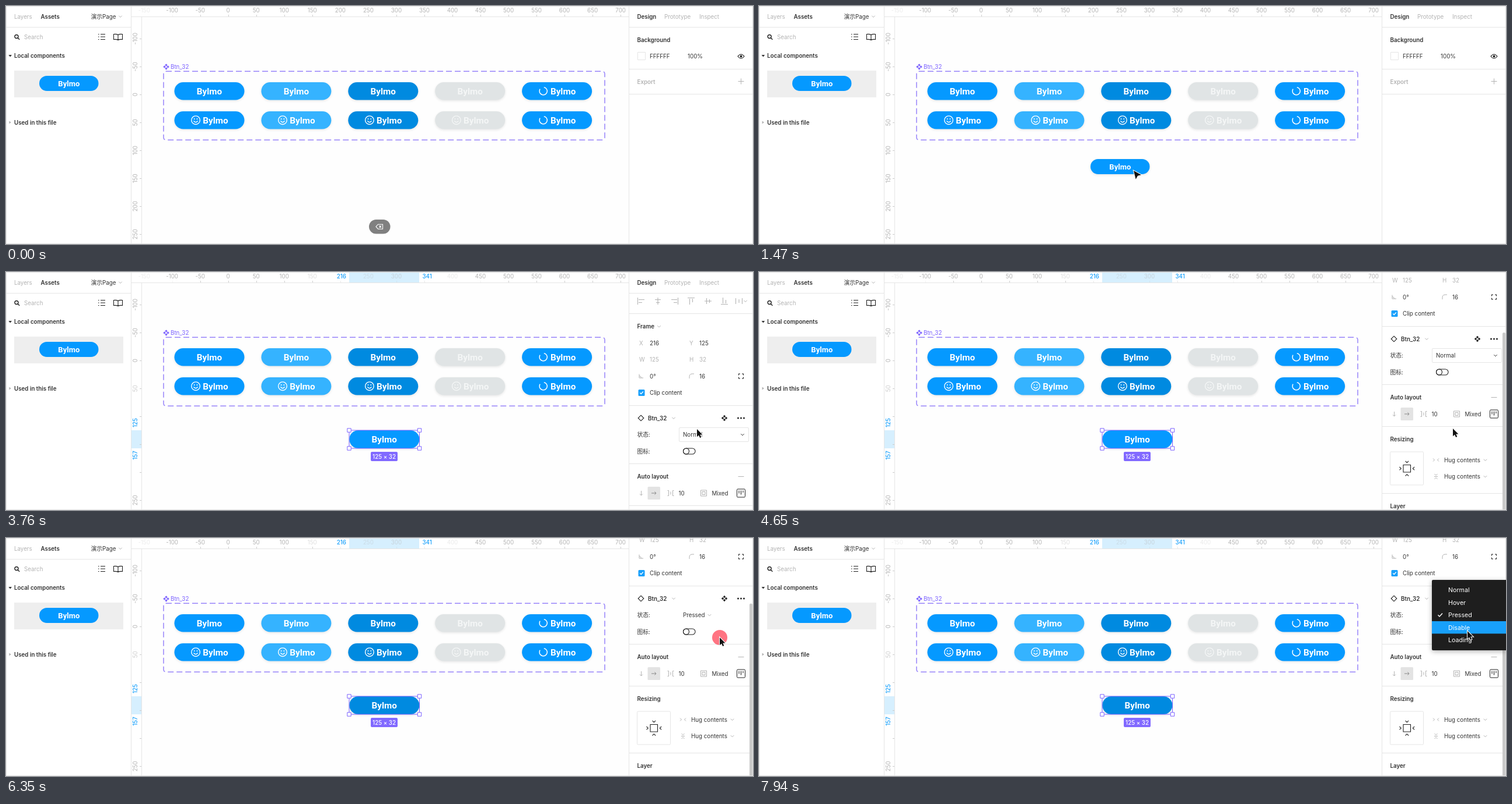
These frames come from a looping animation (1280 px wide and 409 px high, 8 s). An HTML page with a canvas:

```html
<!DOCTYPE html>
<html lang="en">
<head>
<meta charset="utf-8">
<title>Button component demo</title>
<style>
html, body { margin: 0; width: 100%; height: 100%; overflow: hidden; background: #fff; }
canvas { display: block; width: 1280px; height: 409px; }
</style>
</head>
<body>
<canvas id="stage"></canvas>
<script>
const W = 1280, H = 409, LOOP = 8000;
const canvas = document.getElementById('stage');
const c = canvas.getContext('2d');
const dpr = window.devicePixelRatio || 1;
canvas.width = W * dpr;
canvas.height = H * dpr;

const INK = '#333', MUTED = '#b3b3b3', LINE = '#e5e5e5', PURPLE = '#7b61ff', ACCENT = '#18a0fb';
const BLUE = '#0599ff', DARK = '#008ae0';
const FILLS = [BLUE, '#35b3ff', DARK, '#e0e4e5', BLUE];
const BRAND = 'Bylmo';
const STATES = ['Normal', 'Hover', 'Pressed', 'Disable', 'Loading'];

const DROP = 2710, OPEN_1 = 5350, PICK = 6200, CLOSE_1 = 6240, OPEN_2 = 7090;
const CLICKS = [930, OPEN_1, PICK, OPEN_2];

// time, x, y of the pointer tip
const PATH = [
  [60, 377, 355], [650, 60, 128], [880, 60, 128], [1000, 78, 124], [1470, 642, 283],
  [1650, 653, 285], [1710, 655, 285], [1880, 676, 286], [2120, 676, 286], [2240, 670, 285],
  [2690, 670, 285], [2710, 660, 284], [3120, 845, 270], [3290, 845, 270], [3470, 1167, 271],
  [3650, 1167, 271], [3760, 1184, 270], [4180, 1184, 270], [4410, 1188, 269], [4650, 1189, 269],
  [4800, 1189, 269], [5300, 1233, 131], [5470, 1233, 131], [6000, 1223, 171], [6350, 1223, 171],
  [6880, 1216, 137], [7130, 1216, 137], [7550, 1216, 183], [7760, 1216, 169], [7880, 1216, 169],
  [7940, 1214, 160]
];
const SCROLL = [[4180, 0], [4410, 133], [4600, 133], [4650, 136], [4780, 147]];

const clamp = v => Math.max(0, Math.min(1, v));
const ease = p => (1 - Math.cos(Math.PI * clamp(p))) / 2;

function track(keys, t) {
  let i = 0;
  while (i < keys.length - 2 && t >= keys[i + 1][0]) i++;
  const a = keys[i], b = keys[i + 1], p = ease((t - a[0]) / (b[0] - a[0]));
  return a.slice(1).map((v, k) => v + (b[k + 1] - v) * p);
}

// ---- drawing helpers ----
function text(s, x, y, color = INK, weight = 400, align = 'left', size = 9.77, family = 'Inter') {
  c.font = `${weight} ${size}px ${family}, "Noto Sans CJK SC", "Noto Sans CJK", sans-serif`;
  c.textAlign = align;
  c.fillStyle = color;
  c.fillText(s, x, y + size * 0.363);
}
const bold = (s, x, y, color) => text(s, x, y, color, 600);

function rect(x, y, w, h, color) {
  c.fillStyle = color;
  c.fillRect(x, y, w, h);
}
const hline = (x, y, w) => rect(x, y, w, 1, LINE);

function box(x, y, w, h, r, fill, stroke, lw = 1) {
  c.beginPath();
  c.roundRect(x, y, w, h, r);
  if (fill) { c.fillStyle = fill; c.fill(); }
  if (stroke) { c.strokeStyle = stroke; c.lineWidth = lw; c.stroke(); }
}

function icon(d, x, y, color = INK, lw = 1, fill) {
  c.save();
  c.translate(x, y);
  const p = new Path2D(d);
  if (fill) { c.fillStyle = fill; c.fill(p); }
  if (lw) { c.strokeStyle = color; c.lineWidth = lw; c.stroke(p); }
  c.restore();
}
const chevron = (x, y, color = MUTED) => icon('M-2.7-1.3L0 1.4L2.7-1.3', x, y, color);

function diamonds(x, y, color) {
  const d = [[0, -3], [3, 0], [0, 3], [-3, 0]]
    .map(([a, b]) => `M${a} ${b - 2.2}l2.2 2.2l-2.2 2.2l-2.2-2.2z`).join('');
  icon(d, x, y, color, 0, color);
}

function pill(x, y, w, h, color) {
  c.save();
  c.shadowColor = 'rgba(0,0,0,.1)';
  c.shadowBlur = 4 * dpr;
  c.shadowOffsetY = 1.5 * dpr;
  box(x, y, w, h, h / 2, color);
  c.restore();
}
const brand = (x, y, size = 15.3, color = '#fff') => text(BRAND, x, y, color, 700, 'center', size, 'Roboto');

function smallPill(x, y, shadow) {
  if (shadow) pill(x, y, 101.5, 26, BLUE);
  else box(x, y, 101.5, 26, 13, BLUE);
  brand(x + 50.8, y + 12.8, 13);
}

// ---- canvas area ----
function components() {
  diamonds(274.5, 104.5, PURPLE);
  text('Btn_32', 282, 104.5, PURPLE);
  c.setLineDash([10, 5]);
  box(270, 112.3, 756, 118, 4, null, '#9783fa', 1.5);
  c.setLineDash([]);
  FILLS.forEach((fill, k) => {
    for (let row = 0; row < 2; row++) {
      const x = 288.5 + k * 148.9, y = 131 + row * 50, mid = y + 15.2;
      const ink = k === 3 ? '#f4f6f6' : '#fff';
      pill(x, y, 120, 30.5, fill);
      if (k === 4) {
        c.beginPath();
        c.arc(x + 36.6, mid, 6.6, -1.4, 3.7);
        c.strokeStyle = ink;
        c.lineWidth = 1.5;
        c.stroke();
      } else if (row) {
        icon('M7.3 0A7.3 7.3 0 1 1-7.3 0A7.3 7.3 0 1 1 7.3 0M-3.6 1.2Q0 6 3.6 1.2', x + 36.6, mid, ink, 1.4);
        icon('M-3.3-2.9h1.8v1.8h-1.8zM1.5-2.9h1.8v1.8h-1.8z', x + 36.6, mid, ink, 0, ink);
      }
      brand(x + (row || k === 4 ? 70.5 : 60), mid, 15.3, ink);
    }
  });
}

function instance(color) {
  pill(588.3, 272, 120, 31, color);
  brand(648.3, 287.3);
  box(588, 272, 120.5, 31, 0, null, PURPLE);
  for (const x of [588, 708.5]) for (const y of [272, 303]) box(x - 3.2, y - 3.2, 6.4, 6.4, 0, '#fff', PURPLE);
  box(625, 309, 46, 16, 2, '#8169ff');
  text('125 × 32', 648, 317, '#fff', 500, 'center');
}

function rulers(selected) {
  rect(214, 0, 853, 18, '#fff');
  rect(214, 0, 18, H, '#fff');
  if (selected) {
    rect(588, 1, 120, 17, '#d6effe');
    rect(215, 272, 17, 31, '#d6effe');
  }
  hline(214, 18, 853);
  rect(232, 18, 1, H, LINE);
  const strength = (p, marks) => Math.min(1, ...marks.map(m => clamp((Math.abs(p - m) - 32) / 42)));
  for (let u = -150; u <= 700; u += 50) {
    const x = 380.7 + u * 0.9606;
    if (x > 240) rect(Math.round(x), 15, 1, 3, '#ccc');
    c.globalAlpha = u === -150 ? 0.25 : selected ? strength(x, [575, 721]) : 1;
    text(u, x, 7, MUTED, 400, 'center');
  }
  for (let u = -100; u <= 250; u += 50) {
    const y = 152.2 + u * 0.96;
    c.globalAlpha = 1;
    rect(229, Math.round(y), 3, 1, '#ccc');
    c.globalAlpha = selected ? strength(y, [259, 315]) : 1;
    vertical(u, y, MUTED, 400);
  }
  c.globalAlpha = 1;
  if (selected) {
    text('216', 583, 7, ACCENT, 500, 'right');
    text('341', 713.5, 7, ACCENT, 500);
    vertical('125', 259, ACCENT, 500);
    vertical('157', 315, ACCENT, 500);
  }
}

function vertical(s, y, color, weight) {
  c.save();
  c.translate(221.5, y);
  c.rotate(-Math.PI / 2);
  text(s, 0, 0, color, weight, 'center');
  c.restore();
}

function keyHint(alpha) {
  c.globalAlpha = alpha;
  box(622, 367, 36.5, 24.5, 12.2, '#808080');
  icon('M-6 0L-2.5-4H5.5V4H-2.5ZM-.6-1.8L3 1.8M3-1.8L-.6 1.8', 640, 379.2, '#fff', 1.1);
  c.globalAlpha = 1;
}

// ---- side panels ----
function leftPanel() {
  rect(0, 0, 214, H, '#fff');
  rect(214, 0, 1, H, LINE);
  hline(0, 36, 214);
  text('Layers', 14, 18, MUTED);
  bold('Assets', 59.5, 18);
  text('演示Page', 145.5, 18);
  chevron(196, 18);
  icon('M3 0A3 3 0 1 1-3 0A3 3 0 1 1 3 0M2.2 2.2L5.2 5.2', 18, 52.5, '#222', 1.4);
  text('Search', 31, 53.5, MUTED);
  icon('M-2-4.5H6M-2 0H6M-2 4.5H6M-6-4.5h1.6M-6 0h1.6M-6 4.5h1.6', 164, 53, '#222', 1.1);
  icon('M0-3.5Q-2-5-7.5-4.5V4.5Q-2 4 0 5.5Q2 4 7.5 4.5V-4.5Q2-5 0-3.5V5.5', 192, 53, '#222', 1.1);
  icon('M-2.8-1.6H2.8L0 2z', 7.2, 85.5, INK, 0, INK);
  bold('Local components', 14, 85.5);
  rect(14, 111, 187, 46, '#eee');
  smallPill(57, 120);
  icon('M-1.6-2.6V2.6L1.8 0z', 7, 200, MUTED, 0, MUTED);
  bold('Used in this file', 14, 200);
}

function tabs() {
  bold('Design', 1081.5, 18);
  text('Prototype', 1128, 18, MUTED);
  text('Inspect', 1188, 18, MUTED);
  hline(1067, 36, 213);
}

function pagePanel() {
  tabs();
  bold('Background', 1081.5, 58);
  box(1082.5, 79.5, 13, 13, 0, '#fff', LINE);
  text('FFFFFF', 1103, 86.5);
  text('100%', 1168, 86.5);
  icon('M-5.5 0Q0-7 5.5 0Q0 7-5.5 0z', 1259.5, 86.5, '#222', 1.1);
  icon('M2 0A2 2 0 1 1-2 0A2 2 0 1 1 2 0', 1259.5, 86.5, '#222', 0, '#222');
  hline(1067, 108, 213);
  bold('Export', 1081.5, 130, MUTED);
  icon('M-5 0H5M0-5V5', 1259.5, 129.5, MUTED);
  hline(1067, 151, 213);
}

function framePanel(state, hover) {
  tabs();
  const aligns = [
    'M-5.5-6V6M-4-2.5H6M-4 2.5H2', 'M0-6V6M-5-2.5H5M-3 2.5H3', 'M5.5-6V6M4-2.5H-6M4 2.5H-2',
    'M-6-5.5H6M-2.5-4V6M2.5-4V2', 'M-6 0H6M-2.5-5V5M2.5-3V3', 'M-6 5.5H6M-2.5 4V-6M2.5 4V-2',
    'M-5.5-5V5M5.5-5V5M0-3V3'
  ];
  [1088, 1117, 1146, 1174, 1203, 1231, 1256].forEach((x, i) => icon(aligns[i], x, 50, MUTED, 1.1));
  chevron(1267, 50);
  [71, 229, 329, 401, 516].forEach(y => hline(1067, y, 213));

  bold('Frame', 1081.5, 93.5);
  chevron(1119, 93.5);
  const fields = [['X', '216', 'Y', '125', 122, INK], ['W', '125', 'H', '32', 150, MUTED]];
  for (const [a, v, b, w, y, ink] of fields) {
    text(a, 1085, y, MUTED);
    text(v, 1103, y, ink);
    text(b, 1171, y, MUTED);
    text(w, 1188, y, ink);
  }
  icon('M-3-3.5V3H4M-3-.5Q.5 0 .5 3', 1088, 179, MUTED);
  text('0°', 1103, 179);
  icon('M-4 4V1Q-4-4 1-4H4', 1175, 179, MUTED);
  text('16', 1188, 179);
  icon('M-4-1.5V-4H-1.5M1.5-4H4V-1.5M4 1.5V4H1.5M-1.5 4H-4V1.5', 1259.5, 179, '#222', 1.1);
  box(1083.5, 202, 11, 11, 1.5, ACCENT);
  icon('M-2.7 0L-.8 2L2.8-2', 1089, 207.5, '#fff', 1.3);
  text('Clip content', 1103, 207.5);

  icon('M0-4.8L4.8 0L0 4.8L-4.8 0z', 1088, 251, '#222', 1.1);
  bold('Btn_32', 1100, 251);
  chevron(1144, 251);
  diamonds(1231, 251, '#222');
  for (const x of [-5, 0, 5]) box(1258 + x, 249.5, 3, 3, 1.5, '#222');
  text('状态:', 1081.5, 279.5);
  if (hover) {
    box(1153.5, 267.5, 119, 24, 1.5, '#fff', LINE);
    chevron(1262, 279.5, INK);
  }
  text(state, 1160, 279.5);
  if (!hover) chevron(1160 + c.measureText(state).width + 8, 279.5);
  text('图标:', 1081.5, 308);
  box(1160.5, 303, 20.5, 10, 5, '#fff', '#222', 1.1);
  box(1160.5, 303, 10, 10, 5, null, '#222', 1.1);

  bold('Auto layout', 1081.5, 351);
  icon('M-5 0H5', 1259.5, 351.5, MUTED);
  icon('M0-4V4M-2.5 1.5L0 4L2.5 1.5', 1088.5, 380, MUTED);
  box(1099.5, 369, 21.5, 22, 1.5, '#e3e3e3');
  icon('M-4 0H4M1.5-2.5L4 0L1.5 2.5', 1110, 380, '#888');
  icon('M-5.5-4.5H-3.5V4.5H-5.5M5.5-4.5H3.5V4.5H5.5M0-2.5V2.5', 1139, 380, MUTED);
  text('10', 1152.5, 380);
  box(1190.5, 375, 10, 10, 0, null, MUTED);
  box(1193, 377.5, 5, 5, 0, null, MUTED);
  text('Mixed', 1209.5, 380);
  box(1252.5, 373, 14, 14, 1.5, '#fff', '#222');
  icon('M-3.5-4.5V.5M0-4.5V2.5M3.5-4.5V-1', 1259.5, 380, '#222', 1.1);

  bold('Resizing', 1081.5, 423);
  box(1081.5, 445, 57, 57, 1.5, '#fff', LINE);
  box(1104, 467.5, 12.5, 12.5, 0, null, '#222', 1.1);
  icon('M-2.7-12.8L0-10L2.7-12.8M-2.7 12.8L0 10L2.7 12.8M-12.8-2.7L-10 0L-12.8 2.7M12.8-2.7L10 0L12.8 2.7',
    1110.3, 473.7, '#222', 1.1);
  icon('M-5-2.5L-2.5 0L-5 2.5M5-2.5L2.5 0L5 2.5', 1160, 459, MUTED);
  icon('M-2.5-4.5L0-2L2.5-4.5M-2.5 4.5L0 2L2.5 4.5M-3 0H3', 1160, 487.5, MUTED);
  for (const y of [459, 487.5]) {
    text('Hug contents', 1174, y);
    chevron(1244.5, y);
  }
  bold('Layer', 1081.5, 538);
}

function rightPanel(t, state, y) {
  c.save();
  c.beginPath();
  c.rect(1067, 0, 213, H);
  c.clip();
  rect(1067, 0, 213, H, '#fff');
  if (t < DROP) pagePanel();
  else {
    const scroll = track(SCROLL, t)[0];
    const over = y > 120 && y < 144;
    const hover = (t > 3400 && t < 4720) || (t > 5000 && t < OPEN_2 && over);
    c.translate(0, -scroll);
    framePanel(state, hover);
    c.translate(0, scroll);
    if (t >= 4180) box(1274, scroll * 0.765, 5, 310, 2.5, '#c9c9c9');
  }
  c.restore();
  rect(1067, 0, 1, H, LINE);
}

function menu(top, checked, active) {
  c.save();
  c.shadowColor = 'rgba(0,0,0,.3)';
  c.shadowBlur = 8 * dpr;
  c.shadowOffsetY = 2 * dpr;
  box(1153, top, 127, 121, [2, 0, 0, 2], '#1e1e1e');
  c.restore();
  STATES.forEach((name, i) => {
    const y = top + 17.6 + i * 21.35;
    if (i === active) rect(1153, y - 10.7, 127, 21.4, ACCENT);
    if (i === checked) icon('M-3.5 0L-1 2.7L4-2.8', 1167, y, '#fff', 1.5);
    text(name, 1181, y, '#fff', 400, 'left', 10.66);
  });
}

// ---- pointer ----
function clickDot(t, x, y) {
  for (const start of CLICKS) {
    const age = t - start;
    if (age < 0 || age > 320) continue;
    const fade = clamp((age - 100) / 220);
    c.globalAlpha = 0.9 * (1 - fade * 1.1 > 0 ? 1 - fade * 1.1 : 0);
    const r = 16 * clamp(0.5 + age / 100) * (1 - fade * 0.8);
    box(x - r, y - r, 2 * r, 2 * r, r, '#ff2f45');
    c.globalAlpha = 1;
  }
}

function pointer(x, y) {
  const onCanvas = x > 214 && x < 1067;
  const shape = onCanvas ? 'M0 0L13 7.2L6.9 8.7L3.6 14.8z' : 'M0 0V13.2L3.1 10.4L5.1 15L7.3 14L5.3 9.6H9.4z';
  icon(shape, x, y, '#fff', 2, '#111');
  icon(shape, x, y, '#111', 0, '#111');
}

function draw(t) {
  const [x, y] = track(PATH, t);
  const selected = t >= DROP, picked = t >= CLOSE_1;
  c.setTransform(dpr, 0, 0, dpr, 0, 0);
  rect(0, 0, W, H, '#fefefe');
  components();
  if (selected) instance(picked ? DARK : BLUE);
  if (t < 1000) keyHint(clamp((1000 - t) / 100));
  rulers(selected);
  leftPanel();
  rightPanel(t, picked ? 'Pressed' : 'Normal', y);
  box(0.5, 0.5, W - 1, H - 1, 0, null, LINE);

  if (t >= 1000 && t < DROP) {
    const p = ease((t - 1000) / 470);
    smallPill(x - 21 - 53 * p, y - 4 - 16 * p, true);
  }
  const open = (t >= OPEN_1 && t < CLOSE_1) || t >= OPEN_2;
  if (open) {
    const top = picked ? 72 : 115;
    menu(top, picked ? 2 : 0, Math.floor((y - top - 6.9) / 21.35));
  }
  clickDot(t, x, y);
  if (t >= 60) pointer(x, y);
}

function tick(now) {
  draw(now % LOOP);
  requestAnimationFrame(tick);
}
draw(0);
requestAnimationFrame(tick);
</script>
</body>
</html>
```
